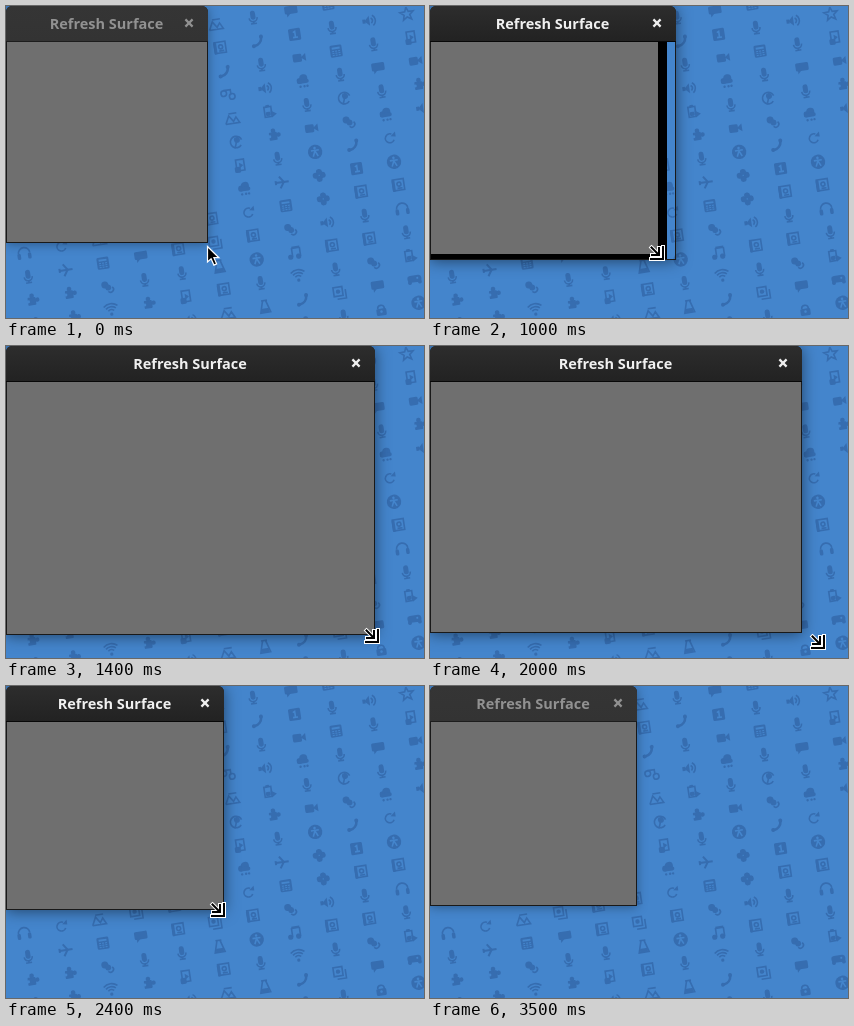
An HTML page with a canvas for the animation above (3.6 s loop, 418 px wide and 312 px high).

```html
<!DOCTYPE html>
<html>
<head>
<meta charset="utf-8">
<title>Refresh Surface</title>
<style>
html, body { margin: 0; width: 100%; height: 100%; overflow: hidden; background: #4485cc; }
canvas { display: block; }
</style>
</head>
<body>
<canvas id="stage" width="418" height="312"></canvas>
<script>
const canvas = document.getElementById('stage');
const ctx = canvas.getContext('2d');
const W = 418, H = 312, LOOP = 3600, STEP = 100, HEADER = 36;
const BLUE = '#4485cc', INK = '#366db0';

const lerp = (a, b, u) => a + (b - a) * u;
const progress = (t, from, to) => Math.min(1, Math.max(0, (t - from) / (to - from)));
const ease = (t, from, to) => (1 - Math.cos(Math.PI * progress(t, from, to))) / 2;

function trace(g, points) {
  g.beginPath();
  for (let i = 0; i < points.length; i += 2) g.lineTo(points[i], points[i + 1]);
}
function line(g, ...points) { trace(g, points); g.stroke(); }
function poly(g, ...points) { trace(g, points); g.closePath(); g.fill(); }
function disc(g, x, y, r) { g.beginPath(); g.arc(x, y, r, 0, 7); g.fill(); }
function arc(g, x, y, r, from = 0, to = 7) { g.beginPath(); g.arc(x, y, r, from, to); g.stroke(); }
function box(g, x, y, w, h, r = 1.5) { g.beginPath(); g.roundRect(x, y, w, h, r); g.fill(); }

// Draws in the background colour, to cut details out of an icon.
function cut(g, draw) {
  g.save();
  g.fillStyle = g.strokeStyle = BLUE;
  draw();
  g.restore();
}
function tile(g, detail) {
  box(g, -6, -6, 12, 12);
  cut(g, detail);
}

const icons = {
  mic(g) { box(g, -2.5, -7, 5, 9, 2.5); arc(g, 0, 0, 4, 0, Math.PI); line(g, 0, 4, 0, 6); line(g, -3, 6, 3, 6); },
  phone(g) { g.lineWidth = 2.6; arc(g, -4, -4, 8.5, 0.1, 1.45); disc(g, 4.4, -4, 2); disc(g, -4, 4.4, 2); },
  speaker(g) { box(g, -7, -2, 3, 4, 0); poly(g, -5, 0, 0, -5, 0, 5); for (const r of [3, 6]) arc(g, 0, 0, r, -1, 1); },
  calc(g) {
    tile(g, () => {
      g.fillRect(-4, -4, 8, 2);
      for (let y = 0; y < 5; y += 2) for (let x = -4; x < 4; x += 3) g.fillRect(x, y - 0.5, 2, 1);
    });
  },
  doc(g) { g.strokeRect(-4, -6, 8, 11); box(g, -6, 1, 6, 6); poly(g, -1, -3, 3, 0, -1, 3); },
  video(g) { box(g, -6, -4, 9, 8); poly(g, 2, 0, 7, -4, 7, 4); },
  cloud(g) { disc(g, -3, -1, 3); disc(g, 1, -3, 4); box(g, -6, -2, 12, 4, 2); for (const x of [-3, 1, 4]) disc(g, x, 5, 1.2); },
  refresh(g) { arc(g, 0, 0, 4.5, 0.5, 5.2); poly(g, 1, -2, 6, -6, 6, -1); },
  person(g) {
    disc(g, 0, 0, 7.2);
    cut(g, () => { disc(g, 0, -4, 1.3); line(g, -4, -1.5, 4, -1.5); line(g, -2.5, 4.5, 0, -1, 2.5, 4.5); });
  },
  book(g) { g.strokeRect(-5, -6, 11, 11); box(g, -6, -6, 3, 12); arc(g, 1, -1, 2); line(g, -1, 3, 4, 3); },
  puzzle(g) { box(g, -4.5, -3, 8, 8, 1); disc(g, 0, -4.5, 2.3); disc(g, 5, 0, 2.2); cut(g, () => disc(g, -4, 1, 1.5)); },
  wifi(g) { disc(g, 0, 4, 1.6); for (const r of [4.5, 7.5, 10.5]) arc(g, 0, 4, r, -2.3, -0.85); },
  notes(g) { for (const x of [-4, 4]) { disc(g, x, 4, 2.6); line(g, x + 2, 4, x + 2, -5); } g.lineWidth = 2.5; line(g, -2, -5, 6, -5); },
  headphones(g) { arc(g, 0, 0, 5.7, Math.PI, 0); for (const x of [-7, 3.5]) box(g, x, 0, 3.5, 6); },
  gamepad(g) { box(g, -7, -4, 14, 7, 3); for (const x of [-5, 5]) disc(g, x, 3, 2); cut(g, () => disc(g, 3, -1, 1)); },
  airplane(g) { g.lineWidth = 2; line(g, -6, 0, 7, 0); line(g, -2, -6, 2, 0, -2, 6); line(g, -6, -2, -6, 2); },
  image(g) { line(g, -7, 5, -3, -3, 1, 3, 4, -1, 7, 5, -7, 5); line(g, -3, -5, 5, -5); },
  lock(g) { box(g, -5, -1, 10, 7); arc(g, 0, -1, 3.3, Math.PI, 0); cut(g, () => disc(g, 0, 2, 1.3)); },
  flask(g) { line(g, -3, -6, 3, -6); line(g, -1.5, -6, -5, 6, 5, 6, 1.5, -6); box(g, -4, 2, 8, 4); },
  talk(g) { box(g, -6, -5, 13, 8); poly(g, -4, 2, 0, 2, -4, 6); },
  bird(g) { disc(g, -2, -2, 3.5); disc(g, 1, 1, 3); arc(g, 3, 3, 3, -0.8, 2.5); },
  cluster(g) { for (let a = 0; a < 6; a += 1.6) disc(g, 3.5 * Math.cos(a), 3.5 * Math.sin(a), 3); },
  links(g) { for (const x of [-4, 4]) arc(g, x, x / 2, 2.8); line(g, -4, -5, 3, -5, 3, -1); },
  quill(g) { arc(g, 0, 0, 5.8, 0.7, 6); disc(g, 1, -2, 3); line(g, 1, -2, -2, 6); },
  energy(g) { g.strokeRect(-5, -5, 7, 10); box(g, -3.5, -7, 4, 2); box(g, -4, 0, 5, 4); poly(g, 1, -1, 7, 3, 2, 6); },
  joined(g) { g.strokeRect(-6, -6, 9, 9); line(g, -3, 6, 6, 6, 6, -3); disc(g, -1.5, -1.5, 2.2); },
  one(g) { tile(g, () => { line(g, -1.5, -2, 0.5, -3, 0.5, 3); line(g, -2, 3, 3, 3); }); },
  '*star'(g) {
    const points = [];
    for (let i = 0; i <= 10; i++) {
      const r = i % 2 ? 3 : 7, a = i * Math.PI / 5 - Math.PI / 2;
      points.push(r * Math.cos(a), r * Math.sin(a));
    }
    line(g, ...points);
  }
};
const iconByLetter = Object.fromEntries(Object.entries(icons).map(([name, draw]) => [name[0], draw]));

// Wallpaper rows on a slanted lattice: each letter is an icon's initial.
const FIRST_ROW = -3, FIRST_COL = -6;
const ROWS = `
......imtc..
......bpoms*
......pmvcmd
......lscmtv
......iemqmp
......qpvbcs
......dmpcf.
......caco..
`;
const LAYOUT = [
  'image mic talk calc', 'book phone one mic speaker *star', 'phone mic video calc mic doc',
  'links speaker cloud mic talk video', 'image energy mic quill mic puzzle', 'quill puzzle video bird cloud speaker',
  'doc mic person phone refresh', 'cloud airplane cluster one person',
  'headphones refresh image joined book book refresh calc cluster book book',
  'mic airplane calc talk book joined book bird speaker mic headphones',
  'puzzle puzzle bird mic mic flask person notes book book mic',
  'puzzle puzzle wifi puzzle doc book mic wifi mic bird energy',
  'mic mic mic mic speaker image flask phone joined talk gamepad',
  'mic mic mic mic mic mic mic mic mic lock person'
].map(row => row.split(' '));
const FULL_ROW = 8;

function makeWallpaper() {
  const paper = document.createElement('canvas');
  paper.width = W;
  paper.height = H;
  const g = paper.getContext('2d');
  g.fillStyle = BLUE;
  g.fillRect(0, 0, W, H);
  LAYOUT.forEach((row, i) => row.forEach((name, j) => {
    const r = i + FIRST_ROW, c = j + (i < FULL_ROW ? 0 : FIRST_COL);
    g.save();
    g.translate(222 + 37.4 * c + 4.1 * r, 89 - 6.8 * c + 23.5 * r);
    g.rotate(-0.15);
    g.fillStyle = g.strokeStyle = INK;
    g.lineWidth = 1.6;
    icons[name](g);
    g.restore();
  }));
  return paper;
}
const wallpaper = makeWallpaper();

function windowPath(w, h) {
  ctx.beginPath();
  ctx.roundRect(0, 0, w, h, [6, 6, 0, 0]);
}

function drawWindow(w, h, active, lagging) {
  ctx.save();
  ctx.shadowColor = active ? 'rgba(0,0,0,.5)' : 'rgba(0,0,0,.35)';
  ctx.shadowBlur = active ? 15 : 11;
  ctx.shadowOffsetY = 1;
  ctx.fillStyle = '#191919';
  windowPath(w, h);
  ctx.fill();
  ctx.restore();

  ctx.save();
  windowPath(w, h);
  ctx.clip();
  const bar = ctx.createLinearGradient(0, 0, 0, HEADER);
  bar.addColorStop(0, active ? '#2d2d2d' : '#353535');
  bar.addColorStop(1, active ? '#222222' : '#333333');
  ctx.fillStyle = bar;
  ctx.fillRect(0, 0, w, HEADER - 1);
  ctx.fillStyle = active ? '#080808' : '#1d1d1d';
  ctx.fillRect(0, HEADER - 1, w, 1);
  const bodyHeight = h - HEADER - 1;
  if (lagging) {
    ctx.drawImage(wallpaper, w - 9, HEADER, 8, bodyHeight, w - 9, HEADER, 8, bodyHeight);
    ctx.fillStyle = '#000';
    ctx.fillRect(1, HEADER, w - 10, bodyHeight);
  }
  ctx.fillStyle = '#6f6f6f';
  ctx.fillRect(1, HEADER, w - (lagging ? 19 : 2), bodyHeight - (lagging ? 5 : 0));
  ctx.restore();

  ctx.fillStyle = ctx.strokeStyle = active ? '#f0f0f0' : '#919191';
  ctx.font = '700 14.5px "Open Sans", sans-serif';
  ctx.textAlign = 'center';
  ctx.fillText('Refresh Surface', w / 2 - 0.5, 23);
  ctx.lineWidth = 2.2;
  for (const side of [-3.6, 3.6]) line(ctx, w - 19 - side, 13.4, w - 19 + side, 20.6);
}

function drawResizeCursor(x, y) {
  ctx.save();
  ctx.translate(x, y);
  ctx.lineCap = 'square';
  for (const [color, width] of [['#fff', 4], ['#000', 2]]) {
    ctx.strokeStyle = color;
    ctx.lineWidth = width;
    line(ctx, 2.5, 2.5, 9.5, 9.5);
    for (const [near, far] of [[3, 10], [2, 14]]) line(ctx, near, far, far, far, far, near);
  }
  ctx.restore();
}

function drawPointer(x, y) {
  ctx.save();
  ctx.translate(x + 0.5, y + 0.5);
  ctx.fillStyle = '#000';
  ctx.strokeStyle = '#fff';
  ctx.lineWidth = 1.2;
  poly(ctx, 0, 0, 0, 15.5, 3.6, 12.2, 6.4, 18.6, 9.2, 17.4, 6.4, 11.2, 11.4, 11.2);
  ctx.closePath();
  ctx.stroke();
  ctx.restore();
}

// A drag out and back: start value, widest value, final value.
function drag(start, peak, end, grow, shrink) {
  return Math.round(lerp(lerp(start, peak, grow), end, shrink));
}

function drawScene(time) {
  const t = Math.floor(time / STEP) * STEP;
  const grow = ease(t, 720, 1600), shrink = ease(t, 1865, 2500);
  const handGrow = ease(t, 800, 1600), handShrink = ease(t, 1935, 2475);
  const w = drag(202, 392, 207, grow, shrink);
  const h = drag(237, 295, 220, Math.pow(grow, 0.85), shrink);

  ctx.drawImage(wallpaper, 0, 0);
  drawWindow(w, h, t >= 600 && t < 3500, t >= 900 && t < 1200);
  if (t < 100) {
    drawPointer(201, 240);
  } else if (t < 2800) {
    drawResizeCursor(drag(190, 387, 195, handGrow, handShrink), drag(230, 291, 212, handGrow, handShrink));
  } else if (t < 3300) {
    const leave = progress(t, 2700, 3100);
    drawPointer(lerp(213, 107, leave), lerp(240, 30, leave));
  }
}

const start = performance.now();
function tick() {
  drawScene((performance.now() - start) % LOOP);
  requestAnimationFrame(tick);
}
tick();
</script>
</body>
</html>
```
